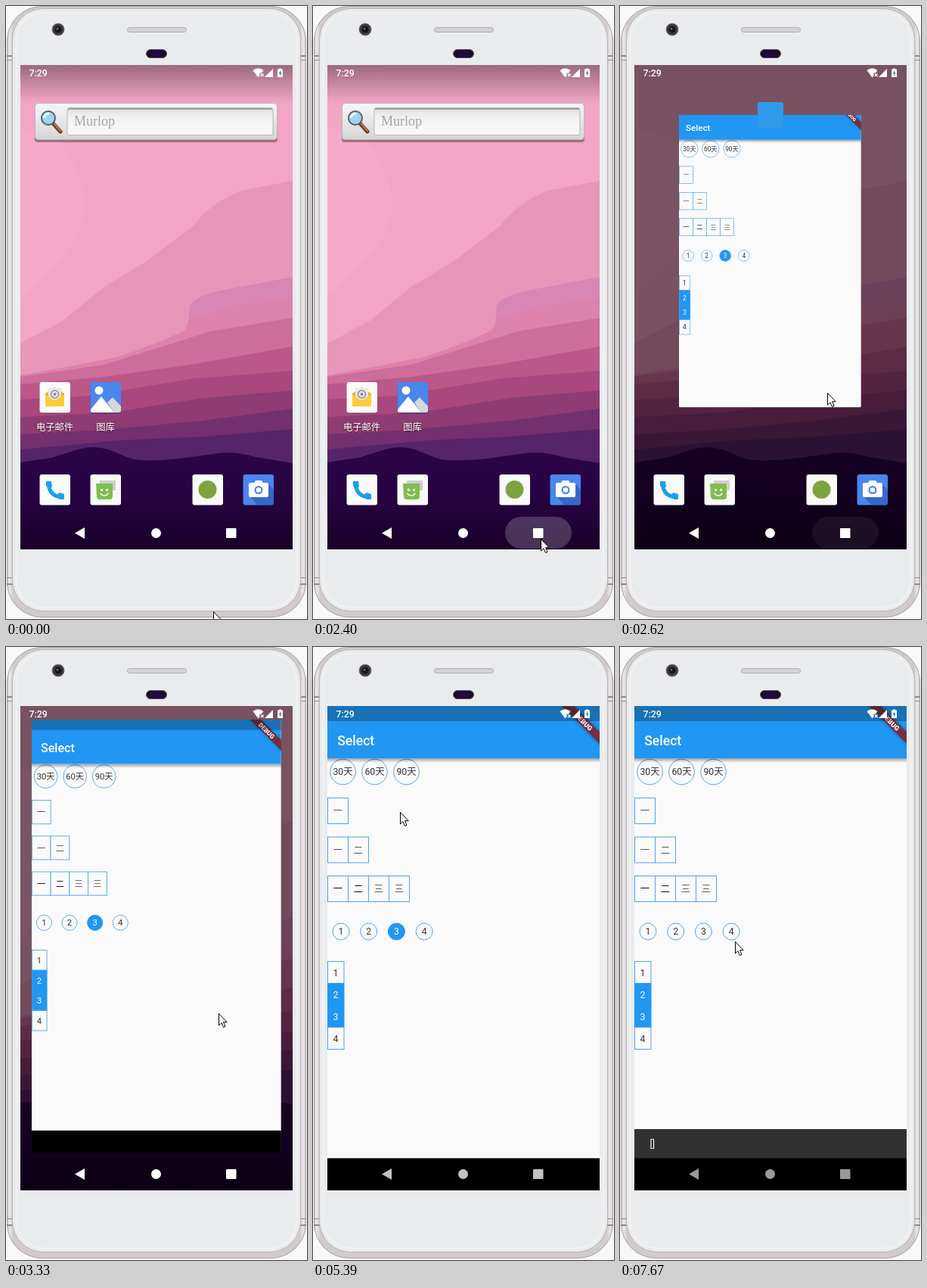
An HTML page for the animation above (8000 ms loop, 398 by 810 pixels).

```html
<!DOCTYPE html>
<html lang="zh">
<head>
<meta charset="utf-8">
<title>Phone</title>
<style>
html, body { margin: 0; width: 100%; height: 100%; overflow: hidden; background: #f8f8f8; }
svg { display: block; width: 100vw; height: 100vh; }
text { font-family: Roboto, "Noto Sans CJK SC", "Noto Sans CJK", sans-serif; font-size: 12.3px; }
.mid { text-anchor: middle; }
.bold { font-weight: 500; fill: #fff; }
.line { fill: #fafafa; stroke: #55a0f1; stroke-width: 1; }
</style>
</head>
<body>
<svg viewBox="0 0 398 810">
  <defs>
    <clipPath id="screen"><rect x="19" y="78" width="360" height="640"/></clipPath>
    <clipPath id="crop"><rect id="cropBox" x="19" width="360"/></clipPath>
    <linearGradient id="shade" x2="0" y2="1">
      <stop stop-opacity=".36"/><stop offset="1" stop-opacity="0"/>
    </linearGradient>
    <linearGradient id="drop" x2="0" y2="1">
      <stop stop-opacity=".36"/><stop offset="1" stop-opacity="0"/>
    </linearGradient>
    <linearGradient id="night" x2="0" y2="1">
      <stop stop-color="#2c0449"/><stop offset=".5" stop-color="#270341"/><stop offset="1" stop-color="#190028"/>
    </linearGradient>
    <linearGradient id="bar" x2="0" y2="1">
      <stop stop-color="#f7f7f7"/><stop offset="1" stop-color="#d5d5d5"/>
    </linearGradient>
    <linearGradient id="field" x2="0" y2="1">
      <stop stop-color="#dedede"/><stop offset=".35" stop-color="#f1f1f1"/><stop offset="1" stop-color="#fafafa"/>
    </linearGradient>
    <linearGradient id="metal">
      <stop stop-color="#c9c3c4"/><stop offset=".008" stop-color="#ece8e8"/><stop offset=".02" stop-color="#d2cbcc"/>
      <stop offset=".98" stop-color="#d2cbcc"/><stop offset=".992" stop-color="#ece8e8"/><stop offset="1" stop-color="#c9c3c4"/>
    </linearGradient>
  </defs>

  <!-- phone body -->
  <rect x="290" y="0" width="10" height="3" fill="#8d8586"/>
  <rect x="1.5" y=".5" width="395" height="807" rx="46" fill="url(#metal)" stroke="#a79fa0"/>
  <g fill="#91898a">
    <rect x="1" y="65" width="8" height="2"/><rect x="1" y="71" width="8" height="1"/>
    <rect x="389" y="65" width="8" height="2"/><rect x="389" y="71" width="8" height="1"/>
    <rect x="1" y="755" width="8" height="1"/><rect x="1" y="763" width="8" height="2"/>
    <rect x="389" y="755" width="8" height="1"/><rect x="389" y="763" width="8" height="2"/>
  </g>
  <rect x="8.5" y="3.5" width="381" height="796" rx="41" fill="#e9ebed" stroke="#b9b2b3"/>
  <rect x="13.5" y="8.5" width="371" height="786" rx="36" fill="#e9ebed" stroke="#f1f2f3" stroke-width="2"/>
  <rect x="160.500" y="28.500" width="78" height="6" rx="3" fill="#d3d3d5" stroke="#aeaeb1"/>
  <circle cx="69" cy="31" r="8" fill="#3b3b40" stroke="#77777b"/>
  <circle cx="69" cy="31" r="4.500" fill="#15151c"/><circle cx="68" cy="30" r="1.500" fill="#6a6a78"/>
  <rect x="185.500" y="57.500" width="27" height="11" rx="5.500" fill="#15101c" stroke="#5a565e"/>
  <rect x="191" y="58" width="16" height="10" rx="2" fill="#210a38"/>

  <g clip-path="url(#screen)">
    <!-- wallpaper -->
    <rect x="19" y="78" width="360" height="640" fill="#f2a5c4"/>
    <path fill="#f5a9c8" d="M19 160L70 176Q108 228 104 270Q100 305 70 335L19 386Z"/>
    <path fill="#e896b7" d="M379 231L310 244Q268 262 248 290L185 338L130 371L75 416L19 446V718H379Z"/>
    <path fill="#d886b4" d="M379 358L300 373Q250 381 243 396L240 430H379Z"/>
    <path fill="#dd82ab" d="M19 488L90 475L150 463Q200 446 236 429L243 414L300 396L379 386V718H19Z"/>
    <path fill="#cd6d9a" d="M19 490L130 474L200 452L270 430L379 412V718H19Z"/>
    <path fill="#bb5889" d="M19 500L130 490L250 473L379 450V718H19Z"/>
    <path fill="#a8487e" d="M19 520L110 515L250 492L379 482V718H19Z"/>
    <path fill="#8f3b74" d="M19 543L140 537L260 518L379 508V718H19Z"/>
    <path fill="#742f6e" d="M19 566L130 560L260 548L379 532V718H19Z"/>
    <path fill="#562468" d="M19 586L150 574L260 569L379 559V718H19Z"/>
    <path fill="url(#night)" d="M19 603L60 597L95 586Q115 580 135 586L165 598Q180 603 230 598L280 591Q305 588 330 596L379 604V718H19Z"/>
    <rect id="topShade" x="19" y="78" width="360" height="50" fill="url(#shade)"/>
    <rect id="scrim" x="19" y="78" width="360" height="640"/>

    <g id="home">
      <rect x="38" y="130" width="321" height="50" rx="4" fill="#4a3a42" opacity=".5"/>
      <rect x="38.500" y="128.500" width="320" height="48" rx="4" fill="url(#bar)" stroke="#bcb4b8"/>
      <rect x="81" y="134.500" width="272" height="36" rx="3" fill="url(#field)" stroke="#b4b4b4"/>
      <path d="M82 136H352" stroke="#a6a6a6" stroke-width="2"/>
      <path d="M62 155L72 166" stroke="#5b3a2c" stroke-width="5" stroke-linecap="round"/>
      <path d="M64 156L72 165" stroke="#bb7146" stroke-width="2.500" stroke-linecap="round"/>
      <circle cx="56" cy="148" r="9" fill="#9fd4ef" stroke="#53606b" stroke-width="2"/>
      <path d="M50 148Q51 142 57 142" fill="none" stroke="#e9f8ff" stroke-width="3"/>
      <text x="90" y="158" fill="#a5a5a5" style="font:18px 'Liberation Serif',serif">Murlop</text>
      <g id="apps"></g>
      <path fill="#f2b01e" d="M52 512L64.500 504L77 512V529H52Z"/>
      <rect x="56" y="505" width="17" height="16" fill="#e8e8e8"/>
      <circle cx="64.500" cy="513" r="5" fill="none" stroke="#8f8f8f" stroke-width="1.500"/>
      <circle cx="64.500" cy="513" r="2" fill="#8f8f8f"/>
      <path fill="#ffca3d" d="M52 513L64.500 522L77 513V529H52Z"/>
      <circle cx="123" cy="508" r="5.500" fill="#fff"/>
      <path fill="#fff" d="M112 533L126 516L143 537H114Q112 537 112 535Z"/>
      <path fill="#d5d9df" d="M134 524L141 517L152 529V535Q152 537 150 537H143Z"/>
      <g fill="#fff" style="text-shadow:0 1px 2px #0008">
        <text class="mid" x="64.500" y="561">电子邮件</text><text class="mid" x="131.500" y="561">图库</text>
      </g>
    </g>

    <g id="dock">
      <g id="dockTiles"></g>
      <path fill="none" stroke="#1a9ff0" stroke-width="5" d="M56 630Q57 648 74 649"/>
      <path fill="#1a9ff0" d="M53 628H60L61 635L57 638L53 634ZM68 645L71 643L77 645V652H71Z"/>
      <path fill="#cfcfcf" d="M124 627H145V640H124Z"/>
      <path fill="#7fbd4c" d="M119 631H141V648Q141 652 137 652H124Q120 652 120 648Z"/>
      <path fill="#fff" d="M125 638H128V641H125ZM132 638H135V641H132Z"/>
      <path d="M124.500 644Q130 650 135.500 644" fill="none" stroke="#fff" stroke-width="1.500"/>
      <circle cx="266.500" cy="639" r="12" fill="#7da33f"/>
      <path fill="#3568c8" d="M345 630L354 639V657Q354 659 352 659H332L322 648Z"/>
      <path fill="#fff" d="M322 630H328L330 627H338L340 630H345Q347 630 347 632V647Q347 649 345 649H323Q321 649 321 647V632Q321 630 323 630Z"/>
      <circle cx="334" cy="639.500" r="5.500" fill="#4a86ee"/><circle cx="334" cy="639.500" r="3.300" fill="#fff"/>
    </g>

    <g id="card">
      <g id="app"><g clip-path="url(#crop)">
        <rect x="19" y="78" width="360" height="640" fill="#fafafa"/>
        <g id="widgets"></g>
        <rect x="19" y="147" width="360" height="6" fill="url(#drop)"/>
        <rect x="19" y="78" width="360" height="69" fill="#2196f3"/>
        <text class="bold" x="32.300" y="130" style="font-size:17.5px">Select</text>
        <g transform="translate(379 78) rotate(45)">
          <rect x="-60" y="24.500" width="120" height="10.500" opacity=".45" style="filter:blur(2px)"/>
          <rect x="-60" y="24.500" width="120" height="10.500" fill="#792e3f"/>
          <text class="mid" y="33" fill="#fff" style="font-size:8.9px;font-weight:900">DEBUG</text>
        </g>
        <rect x="19" y="78" width="360" height="20" opacity=".25"/>
        <g id="snack">
          <rect x="19" y="637" width="360" height="42" fill="#323232"/>
          <text id="snackText" x="39.500" y="661" fill="#fff">[]</text>
        </g>
        <rect x="19" y="675.500" width="360" height="43"/>
      </g></g>
      <rect id="badge" x="182" y="127" width="34" height="34" rx="3" fill="#2e9ae9"/>
    </g>

    <!-- system bars -->
    <rect id="ripple" x="254" y="675" width="88" height="42" rx="21" fill="#fff"/>
    <text class="bold" x="30.500" y="92.500">7:29</text>
    <g fill="#fff">
      <path d="M326.500 85Q333.500 79.500 340.500 85L338 88.500H335.500V92L333.500 94.500Z"/>
      <path d="M337 89.500L340.500 93M340.500 89.500L337 93" stroke="#fff" stroke-width="1.200"/>
      <path d="M342 94L353 83V94Z"/>
      <path d="M361 82.500H364V83.500H366V94H359V83.500H361Z"/>
      <path d="M363.200 85L360.800 89.300H362.300V92.500L364.500 88.300H363.200Z" fill="#4b6a88"/>
    </g>
    <g id="nav" fill="#fff">
      <path d="M91 696.500L104 689V704Z"/><circle cx="198.500" cy="696.500" r="6.500"/>
      <rect x="291" y="690" width="13.500" height="13" rx="1"/>
    </g>
  </g>

  <path id="cursor" d="M.5 .5V16L4 12.700L6.500 18.500L9 17.400L6.500 11.700H11.200Z" fill="#fff" stroke="#000" stroke-linejoin="round"/>
</svg>
<script>
const LOOP = 8000;
const $ = id => document.getElementById(id);
const set = (id, attrs) => { for (const k in attrs) $(id).setAttribute(k, attrs[k]); };
const fade = (id, v) => set(id, { opacity: v });

const tile = (x, y, fill = '#fafafa') =>
  `<rect x="${x}" y="${y + 1}" width="40.500" height="40.500" rx="3" opacity=".3"/>
   <rect x="${x}" y="${y}" width="40.500" height="40.500" rx="3" fill="${fill}"/>`;
$('apps').innerHTML = tile(44.5, 497) + tile(111.5, 497, '#4a86ee');
$('dockTiles').innerHTML = tile(44.5, 619) + tile(111.5, 619) + tile(246.5, 619) + tile(313.5, 619, '#4a86ee');

// Widgets inside the app
const label = (x, y, s, fill = '#333', id = '') =>
  `<text class="mid" x="${x}" y="${y}" fill="${fill}" ${id && `id="${id}"`}>${s}</text>`;
const ring = (x, y, r, s, id = '') =>
  `<circle class="line" cx="${x}" cy="${y}" r="${r}" ${id && `id="${id}"`}/>` + label(x, y + 4.3, s, '#333', id && id + 'Text');
const row = (y, chars, dark = 0) => [...chars].map((c, i) =>
  `<rect class="line" x="${19.5 + 27 * i}" y="${y}" width="27" height="34"/>` +
  label(33 + 27 * i, y + 21.5, c, i < dark ? '#111' : '#555')).join('');
const list = ['1', '2', '3', '4'].map((s, i) => {
  const on = i === 1 || i === 2, y = 415.5 + 29 * i;
  return `<rect class="line" x="19.500" y="${y}" width="21.500" height="29" ${on ? 'style="fill:#2196f3;stroke:#2196f3"' : ''}/>` +
    label(30, y + 19, s, on ? '#fff' : '#333');
}).join('');
$('widgets').innerHTML =
  ['30天', '60天', '90天'].map((s, i) => ring(39.5 + 42 * i, 165, 16.8, s)).join('') +
  row(199.5, '一') + row(251, '一二') + row(302.5, '一二三三', 2) +
  [1, 2, 3, 4].map((n, i) => ring(37 + 36.7 * i, 376, 11, n, 'pick' + n)).join('') + list;

const ramp = (t, a, b) => Math.min(1, Math.max(0, (t - a) / (b - a)));
const out = x => 1 - (1 - x) ** 3;

// cubic-bezier(.4, 0, .2, 1)
function swift(x) {
  let a = 0, b = 1, u = .5;
  for (let i = 0; i < 20; i++) {
    u = (a + b) / 2;
    const v = 1 - u;
    if (1.2 * v * v * u + .6 * v * u * u + u ** 3 < x) a = u; else b = u;
  }
  return u * u * (3 - 2 * u);
}

// Pointer path: time, x, y
const path = [
  [0, 274, 800], [1120, 274, 800], [1400, 280, 762], [1640, 303, 716], [1780, 301, 705],
  [2079, 301, 705], [2080, 301, 704], [2440, 301, 704], [2610, 274, 511], [2650, 274, 511],
  [2820, 281, 484], [3340, 281, 484], [3640, 249, 310], [3810, 249, 310], [3950, 235, 360],
  [4090, 235, 360], [4190, 227, 462], [4250, 212, 475], [4600, 87, 269], [4730, 87, 269],
  [5050, 100, 173], [5550, 122, 239], [5690, 122, 239], [6080, 34, 429], [6440, 122, 390],
  [6500, 122, 390], [6530, 110, 389], [6570, 110, 389], [6730, 106, 380], [7300, 106, 380],
  [7650, 152, 389], [LOOP, 152, 389]
];

function pointer(t) {
  const i = path.findIndex(k => k[0] > t), [a, x, y] = path[i - 1], [b, u, v] = path[i];
  const f = (t - a) / (b - a);
  return [Math.round(x + (u - x) * f), Math.round(y + (v - y) * f)];
}

function draw(t) {
  set('cursor', { transform: `translate(${pointer(t)})` });

  // Recents button, then the overview
  fade('ripple', .2 * ramp(t, 2240, 2340) * (1 - ramp(t, 2480, 2680)));
  const dim = ramp(t, 2440, 2590);
  fade('scrim', .5 * dim);
  fade('topShade', 1 - dim);
  fade('home', 1 - ramp(t, 2430, 2550));
  fade('dock', 1 - ramp(t, 3170, 3300));
  fade('card', ramp(t, 2450, 2560));
  const zoom = 1.15 - .15 * out(ramp(t, 2440, 2610));
  set('card', { transform: `translate(199 337) scale(${zoom}) translate(-199 -337)` });

  // Card grows to the full screen
  const p = swift(ramp(t, 3170, 3506)), s = .669 + .331 * p;
  set('app', { transform: `translate(${78 - 59 * p} ${144 - 46 * p}) scale(${s}) translate(-19 -98)` });
  const top = 78 + 20 * (1 - p);
  set('cropBox', { y: top, height: 675.5 + 42.5 * p - top, rx: 2.5 * (1 - p) });
  fade('badge', 1 - ramp(t, 3170, 3260));

  fade('nav', 1 - .4 * ramp(t, 5150, 5550));

  // Choice 3 is cleared and the message slides in
  const on = t < 6990;
  $('pick3').style.cssText = on ? 'fill:#2196f3;stroke:#2196f3' : '';
  set('pick3Text', { fill: on ? '#fff' : '#333' });
  const up = swift(ramp(t, 7020, 7270));
  set('snack', { transform: `translate(0 ${42 * (1 - up)})` });
  fade('snackText', ramp(t, 7130, 7270));
}

const start = performance.now();
(function tick() {
  draw((performance.now() - start) % LOOP);
  requestAnimationFrame(tick);
})();
</script>
</body>
</html>
```
